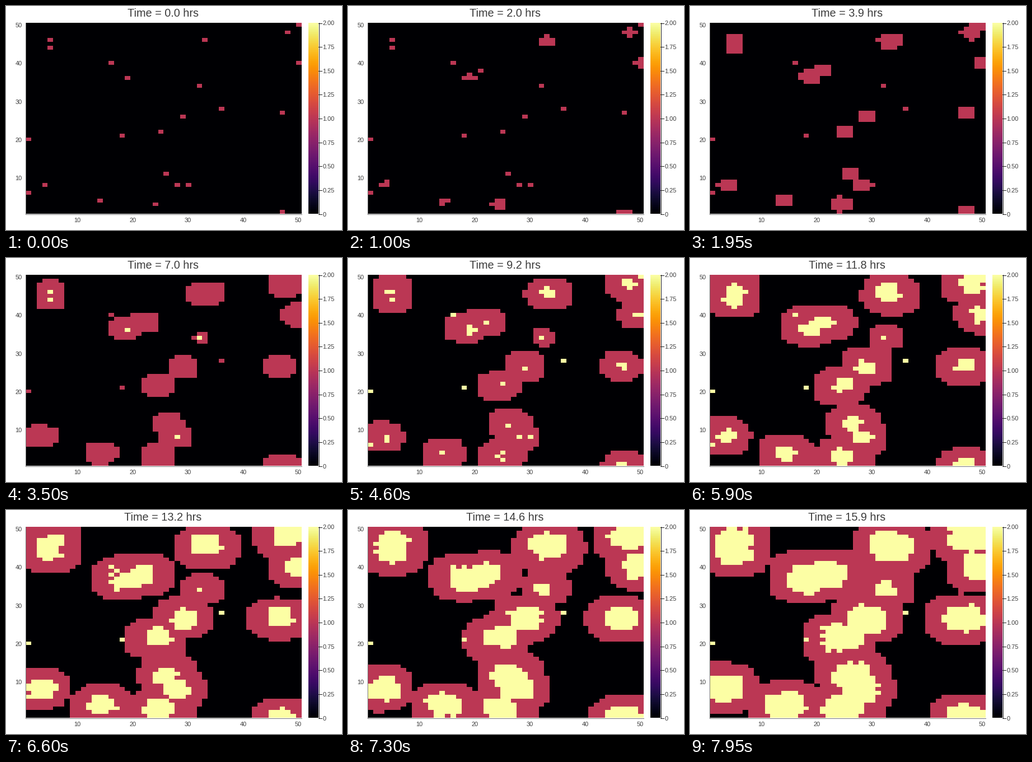
A matplotlib script for the animation above (8000 ms loop, 600x400 px).

```python
import numpy as np
import matplotlib.pyplot as plt
from matplotlib.animation import FuncAnimation

W, H, DPI = 600, 400, 100
N, FRAMES, STEP = 50, 160, 50          # grid size, frame count, ms per frame
LEFT, RIGHT, TOP, BOTTOM = 35, 528, 30, 371
INK = "#3c3c3c"
PX = 72 / DPI

SPEED = 0.42                           # cells per hour
ROUND = 2.6                            # superellipse power of a colony

# column, row, hour growth begins, total drift of the centre (x, y)
COLONIES = [
    (5, 44, 1.1, 0, 0), (5, 46, 1.1, 0, 1),
    (19, 36, 0.5, -1, 1.5), (33, 46, 0.0, 0.5, -1),
    (48, 48, 0.3, -0.5, 0), (50, 50, 1.1, 0, 0), (50, 40, 0.6, 0, 0.2),
    (32, 34, 5.0, 0.8, 0.5), (29, 26, 1.1, 0, 0.8), (25, 22, 1.1, -1.2, -1),
    (26, 11, 1.1, 0.5, 1), (28, 8, 1.1, -0.5, 0), (24, 3, 0.3, 1.5, 0),
    (14, 4, 0.8, 0.5, -0.5), (4, 8, 0.8, -1.5, 0.3),
    (47, 1, 0.6, 0, -1), (47, 27, 1.1, -1, -0.7),
]
OFFSHOOT = (21, 38, 1.1, 1.5, 0)
IDLE = [(1, 6), (1, 20), (16, 40), (18, 21), (30, 8), (36, 28)]

hours = np.arange(FRAMES) / 10
END = hours[-1]
cols, rows = np.meshgrid(np.arange(1, N + 1), np.arange(1, N + 1))


def colony(t, col, row, start, dx, dy):
    """Cells covered at hour t by a patch that widens evenly and drifts."""
    if t < start:
        return np.zeros((N, N), bool)
    s = (t - start) / (END - start)
    u = np.abs(cols - col - dx * s)
    v = np.abs(rows - row - dy * s)
    radius = 0.5 + SPEED * (t - start)
    return u ** ROUND + v ** ROUND <= radius ** ROUND


# hour at which every cell is first infected, then dies
onset = np.full((N, N), np.inf)
for t in hours:
    for patch in COLONIES + [OFFSHOOT]:
        onset[colony(t, *patch) & (onset > t)] = t
for col, row in IDLE + [c[:2] for c in COLONIES]:
    onset[row - 1, col - 1] = 0

rng = np.random.default_rng(4)
death = onset + rng.triangular(6.4, 7.2, 9.2, (N, N))


def state(t):
    return (onset <= t).astype(int) + (death <= t)


fig = plt.figure(figsize=(W / DPI, H / DPI), dpi=DPI, facecolor="white")
ax = fig.add_axes([0, 0, 1, 1])
ax.set_axis_off()


def label(x, y, s, size=11, **kw):
    return ax.text(x, y, s, fontsize=size * PX, color=INK,
                   family="Liberation Sans", **kw)


def heat(data, x0, x1):
    return ax.imshow(data, cmap="inferno", vmin=0, vmax=2, origin="lower",
                     interpolation="nearest", aspect="auto",
                     extent=(x0, x1, BOTTOM, TOP))


grid = heat(state(0), LEFT, RIGHT)
heat(np.linspace(0, 2, 256)[:, None], 540, 558)
ax.set_xlim(0, W)
ax.set_ylim(H, 0)

ax.plot([34.5, 34.5, RIGHT], [TOP, 371.5, 371.5], color="#777777", lw=PX)
for k in range(10, N + 1, 10):
    label(LEFT + (k - 0.5) * (RIGHT - LEFT) / N - 1, 381.5, str(k),
          ha="center", va="center_baseline")
    label(28.5, BOTTOM - (k - 0.5) * (BOTTOM - TOP) / N + 0.8, str(k),
          ha="right", va="center_baseline")

ax.plot([558.5, 558.5], [TOP, 371.5], color="#222222", lw=PX)
for k in range(9):
    y = 371.5 - k * 341 / 8
    ax.plot([558, 564], [y, y], color="#222222", lw=PX)
    label(565.6, y, f"{k / 4:.2f}" if k else "0", va="center_baseline")

title = label(280.3, 18.7, "", 19.9, ha="center", va="baseline")


def update(f):
    grid.set_data(state(hours[f]))
    title.set_text(f"Time = {hours[f]:.1f} hrs")
    return grid, title


anim = FuncAnimation(fig, update, frames=FRAMES, interval=STEP,
                     init_func=lambda: update(0), repeat=True, repeat_delay=0)
plt.show()
```
